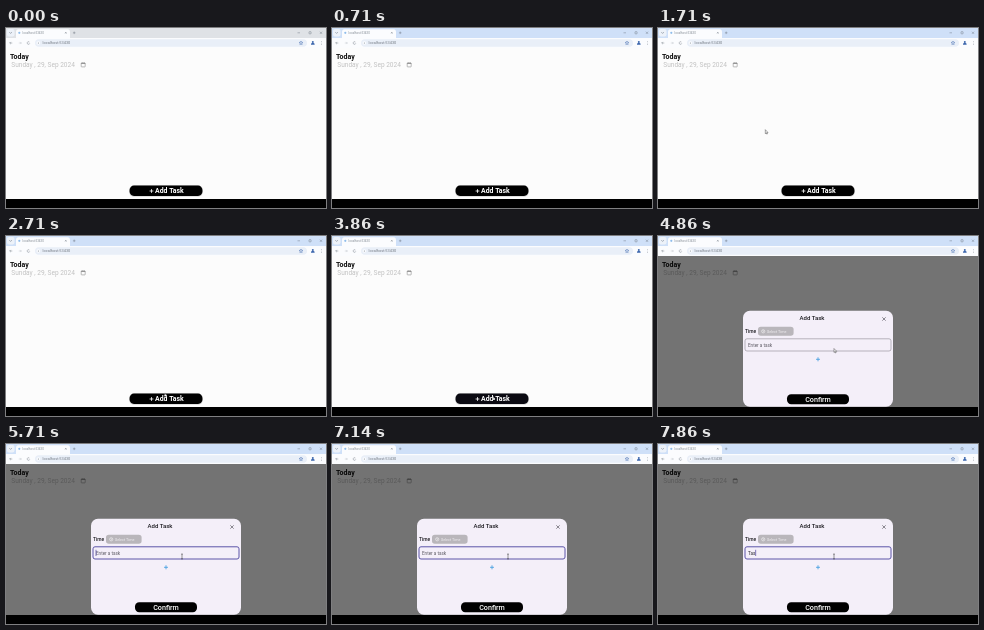
Animation, 320 px wide and 180 px high, one loop 8 s. Source, as an HTML page with a canvas:

```html
<!DOCTYPE html>
<html lang="en">
<head>
<meta charset="utf-8">
<title>Add Task</title>
<style>
html, body { margin: 0; width: 100%; height: 100%; overflow: hidden; background: #000; }
canvas { display: block; width: 320px; height: 180px; }
</style>
</head>
<body>
<canvas id="stage"></canvas>
<script>
const LOOP = 8000;
const ACTIVE_AT = 290, PRESS_AT = 3860, OPEN_AT = 4000, FOCUS_AT = 5710;
const canvas = document.getElementById('stage');
const ctx = canvas.getContext('2d');
const scale = window.devicePixelRatio || 1;
canvas.width = 320 * scale;
canvas.height = 180 * scale;

// time, x, y of the pointer tip
const path = [
  [1290, 54, 75], [1800, 112, 104], [2150, 170, 140], [2430, 160, 157],
  [2710, 159, 157], [3430, 161.5, 160.5], [3860, 161.5, 160.5],
  [4000, 161, 155.5], [4860, 176, 112.5]
];
const typed = [[7290, 'T'], [7570, 'Ta'], [7860, 'Tas']];

function box(x, y, w, h, r, fill, stroke, lw = 0.6) {
  ctx.beginPath();
  ctx.roundRect(x, y, w, h, r);
  if (fill) { ctx.fillStyle = fill; ctx.fill(); }
  if (stroke) { ctx.strokeStyle = stroke; ctx.lineWidth = lw; ctx.stroke(); }
}

function line(color, lw, ...pts) {
  ctx.beginPath();
  for (let i = 0; i < pts.length; i += 2) ctx.lineTo(pts[i], pts[i + 1]);
  ctx.strokeStyle = color;
  ctx.lineWidth = lw;
  ctx.stroke();
}

function dot(x, y, r, fill) {
  ctx.beginPath();
  ctx.arc(x, y, r, 0, Math.PI * 2);
  ctx.fillStyle = fill;
  ctx.fill();
}

function text(str, x, y, size, color, weight = 400, align = 'left') {
  ctx.font = `${weight} ${size}px Roboto, sans-serif`;
  ctx.textAlign = align;
  ctx.fillStyle = color;
  ctx.fillText(str, x, y);
}

function cross(x, y, r, color, lw) {
  line(color, lw, x - r, y - r, x + r, y + r);
  line(color, lw, x - r, y + r, x + r, y - r);
}

function plus(x, y, r, color, lw) {
  line(color, lw, x - r, y, x + r, y);
  line(color, lw, x, y - r, x, y + r);
}

function drawBrowser(t) {
  const ink = '#6b7480', pale = '#b8bec6', blue = '#3c66ad';
  box(0, 0, 320, 10, 0, t < ACTIVE_AT ? '#dfe2e6' : '#cfe0f8');
  box(1, 1, 7.5, 7.5, 2, '#edf2f9');
  line(ink, 0.6, 3.4, 4.2, 4.6, 5.4, 5.8, 4.2);
  box(10, 1.2, 54, 9, [2.5, 2.5, 0, 0], '#fbfcfe');
  dot(13.3, 4.8, 1.1, '#8fbdeb');
  text('localhost:53430', 16.5, 6, 3, '#858c95');
  cross(59.8, 4.8, 0.8, ink, 0.45);
  plus(68.2, 4.8, 1.3, ink, 0.45);
  line(ink, 0.45, 291.5, 4.8, 294, 4.8);
  box(303, 3.7, 2.1, 2.1, 0.3, null, ink, 0.45);
  cross(315, 4.8, 1.1, ink, 0.45);

  box(0, 10, 320, 10, 0, '#fbfcfe');
  line(ink, 0.45, 6.3, 15, 3.7, 15, 4.8, 13.9);
  line(ink, 0.45, 3.7, 15, 4.8, 16.1);
  line(pale, 0.45, 12.8, 15, 15.4, 15, 14.3, 13.9);
  line(pale, 0.45, 15.4, 15, 14.3, 16.1);
  ctx.beginPath();
  ctx.arc(22.5, 15, 1.3, 0.3, 5.5);
  ctx.strokeStyle = ink;
  ctx.stroke();
  box(29, 11.2, 272, 7.6, 3.8, '#e9eff8');
  dot(32.4, 15, 1.8, '#fbfcfe');
  dot(32.4, 15, 0.6, '#8b939d');
  text('localhost:53430', 36.5, 16.3, 3.9, '#747b85');

  ctx.beginPath();
  for (let i = 0; i < 10; i++) {
    const a = i * Math.PI / 5 - Math.PI / 2, r = i % 2 ? 0.9 : 1.9;
    ctx.lineTo(295 + r * Math.cos(a), 15 + r * Math.sin(a));
  }
  ctx.closePath();
  ctx.strokeStyle = blue;
  ctx.lineWidth = 0.5;
  ctx.stroke();
  dot(306.8, 13.9, 1, blue);
  box(305, 15.1, 3.6, 1.7, [1.2, 1.2, 0.2, 0.2], blue);
  for (let i = -1; i <= 1; i++) dot(315.5, 15 + i * 1.4, 0.35, ink);
}

function drawPage(t) {
  box(0, 20, 320, 151, 0, '#fcfcfc');
  text('Today', 3.9, 30.5, 7, '#111', 700);
  text('Sunday , 29, Sep 2024', 5.3, 38.9, 6.55, '#c2c2c2');
  box(75.2, 34.9, 4, 4, 0.5, null, '#777', 0.5);
  line('#777', 0.7, 75.2, 35.5, 79.2, 35.5);
  line('#777', 0.4, 76.2, 34.2, 76.2, 35);
  line('#777', 0.4, 78.2, 34.2, 78.2, 35);

  box(123.2, 157.5, 73.6, 11, 4.6, 'rgba(0,0,0,.22)');
  box(123.6, 157.6, 72.8, 10.3, 4.4, t < PRESS_AT ? '#000' : '#0b0a12');
  plus(145.5, 163, 1.9, '#fff', 0.8);
  text('Add Task', 149, 165.3, 6.9, '#fff', 700);
}

function drawSheet(t) {
  const focused = t >= FOCUS_AT;
  const value = typed.reduce((s, [at, str]) => t >= at ? str : s, '');

  box(0, 20, 320, 151, 0, 'rgba(0,0,0,.54)');
  box(85, 74.8, 150, 96, 7, '#f4eff9');
  text('Add Task', 154, 84.2, 6, '#1c1b20', 500, 'center');
  cross(226, 83, 1.7, '#44424a', 0.6);
  text('Time', 87, 97, 4.9, '#1c1b20', 500);

  box(100, 90.8, 35.6, 9, 2.8, '#b9b6bb');
  ctx.beginPath();
  ctx.arc(105.2, 95.3, 1.6, 0, Math.PI * 2);
  ctx.strokeStyle = '#fff';
  ctx.lineWidth = 0.5;
  ctx.stroke();
  line('#fff', 0.45, 105.2, 94.3, 105.2, 95.4, 106, 95.8);
  text('Select Time', 109, 96.6, 3.7, '#f4f2f5');

  box(87, 102.8, 146, 12.2, 2, null, focused ? '#5c54a8' : '#8b8890', focused ? 1 : 0.6);
  text(value || 'Enter a task', 90, 110.6, 4.6, value ? '#25232a' : '#5a5761');
  if (focused && caretOn(t)) {
    const x = 90 + (value ? ctx.measureText(value).width + 0.3 : 0);
    line('#4c449c', 0.7, x, 105.8, x, 112);
  }
  plus(160, 123.3, 2, '#3a9be0', 0.8);

  box(129, 158.2, 62, 10, 4.2, '#000');
  text('Confirm', 160, 165.9, 7.2, '#fff', 500, 'center');
}

function caretOn(t) {
  return t < 6000 || (t >= 6570 && t < 7140) || t >= 7290;
}

function pointerAt(t) {
  const i = path.findIndex(p => p[0] > t);
  if (i < 0) return path[path.length - 1].slice(1);
  const [t0, x0, y0] = path[i - 1], [t1, x1, y1] = path[i];
  const k = (t - t0) / (t1 - t0), e = k * k * (3 - 2 * k);
  return [x0 + (x1 - x0) * e, y0 + (y1 - y0) * e];
}

function drawPointer(t) {
  if (t < path[0][0]) return;
  const [x, y] = pointerAt(t);
  ctx.save();
  ctx.translate(x, y);
  if (t >= 5000) {
    line('#333', 0.5, 0, -2.3, 0, 2.3);
    line('#333', 0.5, -1, -2.4, 1, -2.4);
    line('#333', 0.5, -1, 2.4, 1, 2.4);
  } else {
    const hand = t >= 2400 && t < 4140;
    const shape = hand
      ? 'M-.3 0L.3 0L.4 1.3L1.6 1.7L1.4 3.5L-.5 3.5L-1.3 2.1L-.4 2.3Z'
      : 'M0 0L0 4L.9 3.2L1.5 4.5L2.1 4.2L1.5 3L2.7 2.9Z';
    const p = new Path2D(shape);
    ctx.fillStyle = '#fff';
    ctx.strokeStyle = '#222';
    ctx.lineWidth = hand ? 0.25 : 0.4;
    ctx.fill(p);
    ctx.stroke(p);
  }
  ctx.restore();
}

function frame(now) {
  const t = now % LOOP;
  ctx.setTransform(scale, 0, 0, scale, 0, 0);
  box(0, 0, 320, 180, 0, '#000');
  drawBrowser(t);
  drawPage(t);
  if (t >= OPEN_AT) drawSheet(t);
  drawPointer(t);
  requestAnimationFrame(frame);
}
requestAnimationFrame(frame);
</script>
</body>
</html>
```
